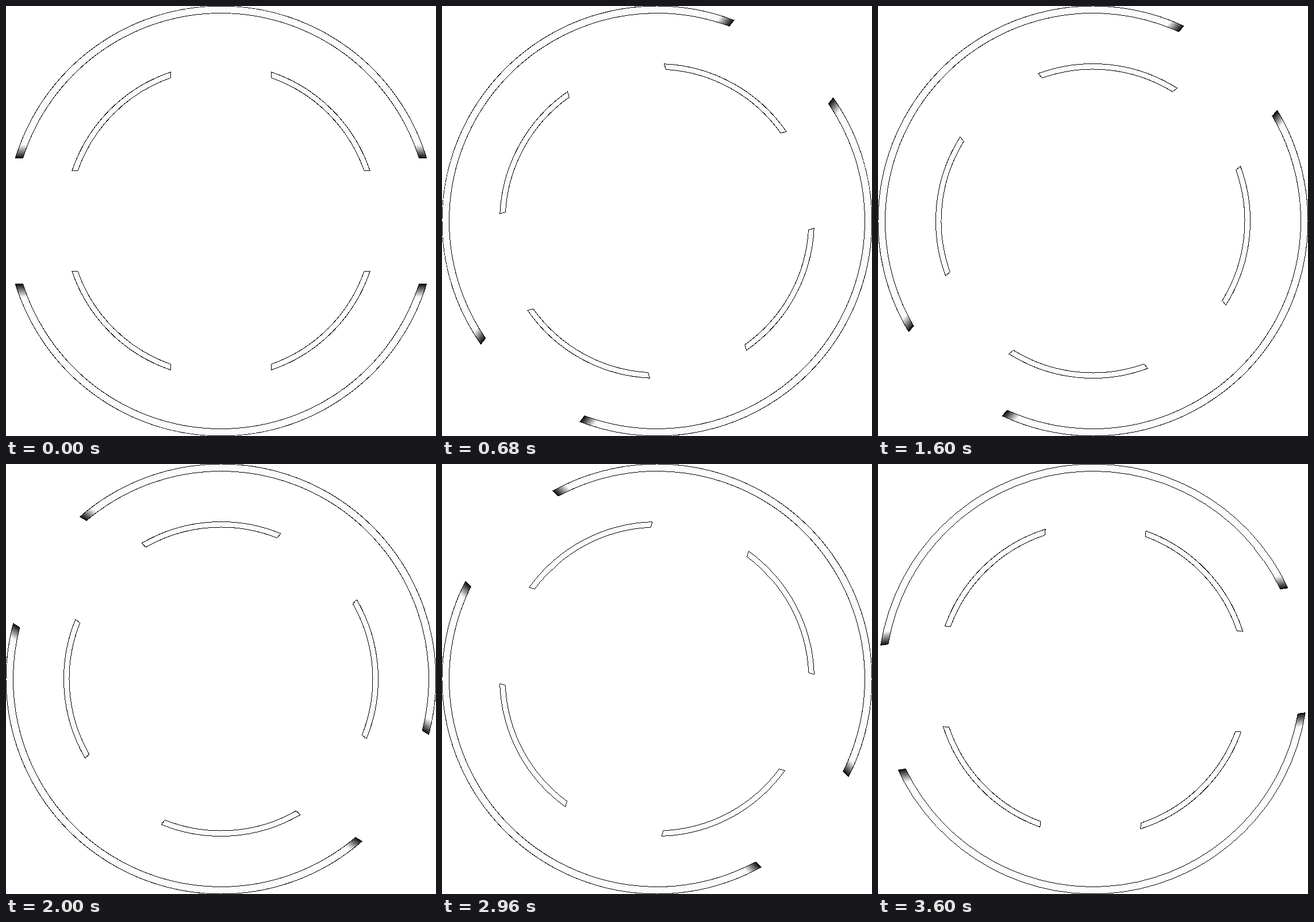
An HTML page for the animation above (3.64 s loop, 748 by 748 pixels).

```html
<!DOCTYPE html>
<html lang="en">
<head>
<meta charset="utf-8">
<title>Rotating rings</title>
<style>
  html, body { margin: 0; width: 100%; height: 100%; overflow: hidden; background: #fff; }
  svg { display: block; width: 748px; height: 748px; }
  path { stroke: #000; stroke-width: 1; shape-rendering: crispEdges; }
</style>
</head>
<body>
<svg id="stage" viewBox="-374 -374 748 748">
  <defs>
    <linearGradient id="fade" gradientUnits="userSpaceOnUse" x1="0" y1="109.5" x2="0" y2="132.5">
      <stop offset="0" stop-color="#0c0c0c"/>
      <stop offset="1" stop-color="#fbfbfb"/>
    </linearGradient>
  </defs>
</svg>
<script>
const STEP = 40, STEPS = 90, LOOP = 3640;
const stage = document.getElementById('stage');

const rings = [
  { outer: 374, inner: 361.5, gap: 109.5, parts: 2, turn: 8, fill: 'url(#fade)' },
  { outer: 273.5, inner: 264, gap: 87.5, parts: 4, turn: -1, fill: '#fbfbfb' }
];

function add(parent, name, attrs = {}) {
  const el = document.createElementNS('http://www.w3.org/2000/svg', name);
  for (const key in attrs) el.setAttribute(key, attrs[key]);
  return parent.appendChild(el);
}

const point = (r, a) => `${r * Math.cos(a)} ${r * Math.sin(a)}`;

// One ring segment whose ends are cut parallel to the axes.
function segment({ outer, inner, gap, parts }) {
  const span = 2 * Math.PI / parts;
  const a = Math.asin(gap / outer), b = Math.asin(gap / inner);
  return `M${point(outer, a)} A${outer} ${outer} 0 0 1 ${point(outer, span - a)}` +
    `L${point(inner, span - b)} A${inner} ${inner} 0 0 0 ${point(inner, b)}Z`;
}

for (const ring of rings) {
  ring.group = add(stage, 'g');
  for (let i = 0; i < ring.parts; i++) {
    add(ring.group, 'path', {
      d: segment(ring),
      fill: ring.fill,
      transform: `rotate(${i * 360 / ring.parts})`
    });
  }
}

// The first pose is held for two steps.
function tick() {
  const t = performance.now() % LOOP;
  const step = Math.min(STEPS - 1, Math.max(0, Math.floor(t / STEP) - 1));
  for (const { group, turn } of rings) {
    group.setAttribute('transform', `rotate(${step * turn})`);
  }
  requestAnimationFrame(tick);
}
tick();
</script>
</body>
</html>
```
